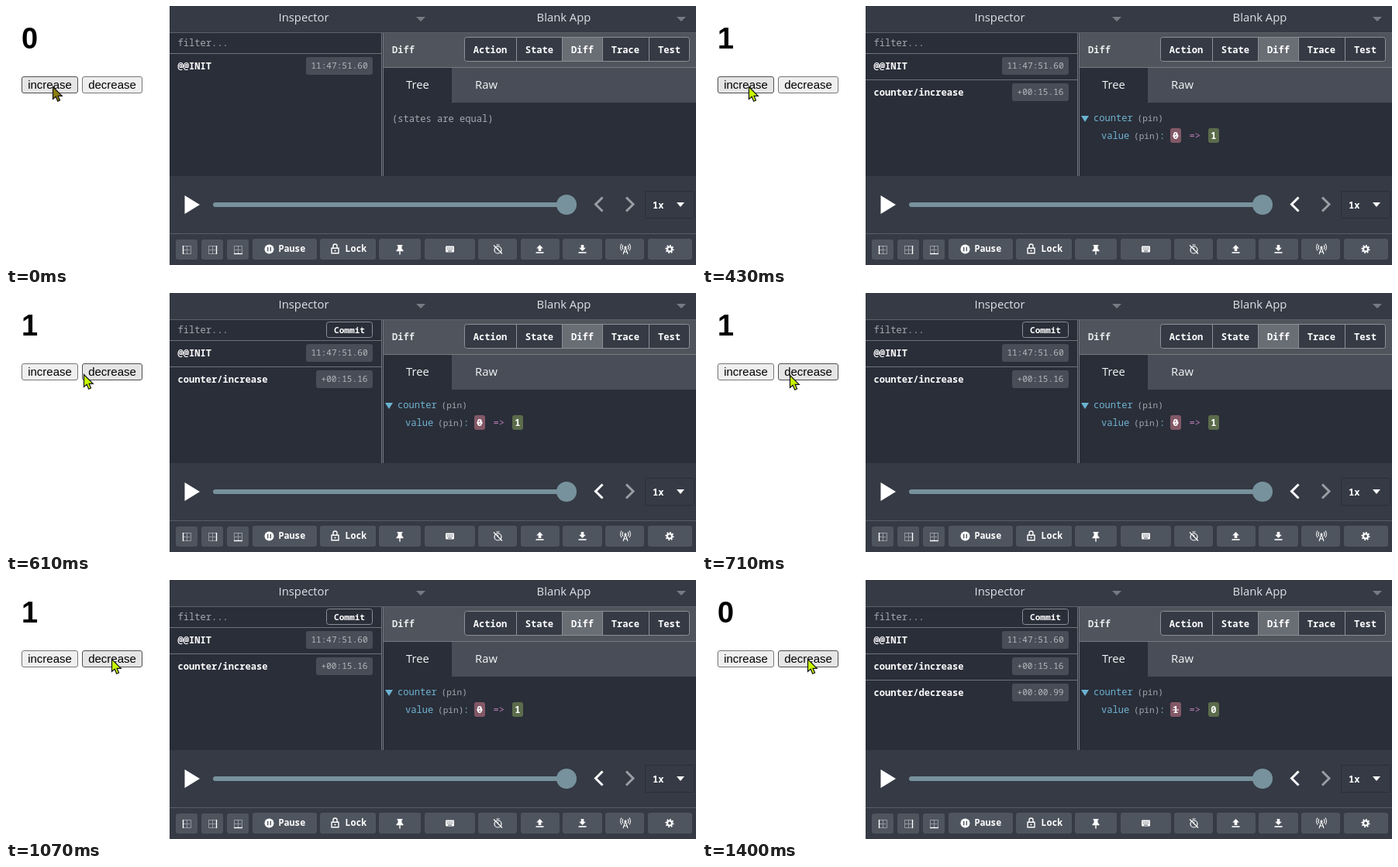
Write an HTML page that moves like this. It is 890x335 px and loops after 1630 ms.

```html
<!DOCTYPE html>
<html lang="en">
<head>
<meta charset="utf-8">
<title>Counter inspector</title>
<style>
  html, body { margin: 0; width: 100%; height: 100%; overflow: hidden; background: #fff; }
  svg { display: block; width: 890px; height: 335px; }
  text { white-space: pre; }
  .page { font: 15px "Liberation Sans", Arial, sans-serif; fill: #000; }
  .count { font: bold 38px "Liberation Sans", Arial, sans-serif; fill: #000; }
  .ui { font: 14.8px "Open Sans", "Noto Sans", sans-serif; fill: #f4f5f6; }
  .head { fill: #dfe2e6; }
  .mono { font: 12.1px "Noto Sans Mono", "DejaVu Sans Mono", monospace; fill: #a6a9ae; }
  .bold { font-weight: 700; fill: #fff; }
  .small { font-size: 11.1px; }
  .key { fill: #6fb3d2; }
  .arrow { fill: #b77bb2; }
  .line { stroke: #6e727a; fill: none; }
  .ico { stroke: #fff; fill: none; stroke-width: 1.4; }
  .solid { fill: #fff; }
</style>
</head>
<body>
<svg id="stage" viewBox="0 0 890 335" xmlns="http://www.w3.org/2000/svg"></svg>
<script>
const LOOP = 1630;
const BG = '#2a2e39', BAR = '#353a45', TAB = '#494d57', BTN = '#4f555f';

const rect = (x, y, w, h, fill, r = 0, extra = '') =>
  `<rect x="${x}" y="${y}" width="${w}" height="${h}" rx="${r}" fill="${fill}" ${extra}/>`;
const text = (x, y, s, cls, anchor = 'start', extra = '') =>
  `<text x="${x}" y="${y}" class="${cls}" text-anchor="${anchor}" ${extra}>${s}</text>`;
const path = (d, cls = 'ico', extra = '') => `<path d="${d}" class="${cls}" ${extra}/>`;
const line = (d, color = '#6e727a') => path(d, 'line', `style="stroke:${color}"`);
const caret = (x, y, w, h, fill) => `<path d="M${x} ${y}h${w}l${-w / 2} ${h}z" fill="${fill}"/>`;
const group = (id, s) => `<g id="${id}">${s}</g>`;

// --- left page ---
const pageButton = (id, x, w, label) =>
  rect(x + .5, 91.5, w - 1, 21, '#efefef', 2.5, `id="${id}" stroke="#767676"`) +
  text(x + w / 2, 107, label, 'page', 'middle');

const page = rect(0, 0, 211, 335, '#fff') + text(20, 55, '0', 'count', 'start', 'id="count"') +
  pageButton('inc', 20, 73, 'increase') + pageButton('dec', 98, 78, 'decrease');

// --- action list ---
const action = (i, name, time, x) => {
  const y = 34 * i;
  return text(221.5, 82 + y, name, 'mono bold') +
    rect(x, 66 + y, 473 - x, 23, TAB, 3) +
    text((x + 473) / 2, 81 + y, time, 'mono small', 'middle', 'style="fill:#b5b8bd"');
};
const rule = y => line(`M211 ${y}H484`);

const list = text(221.5, 52, 'filter...', 'mono') + rule(61.5) +
  group('commit', rect(413.5, 37.5, 59, 20, BG, 3, 'stroke="#8b8f96"') +
    text(443, 52, 'Commit', 'mono bold', 'middle', 'style="font-size:11.1px"')) +
  action(0, '@@INIT', '11:47:51.60', 387) +
  group('row1', rule(95.5) + action(1, 'counter/increase', '+00:15.16', 400)) +
  group('row2', rule(129.5) + action(2, 'counter/decrease', '+00:00.99', 400));

// --- detail pane ---
const modes = [['Action', 624.5], ['State', 688], ['Diff', 743.5], ['Trace', 799], ['Test', 855.5]];
const detail = rect(487, 35, 403, 44, '#50545c') + line('M487 79.5H890', '#767a80') +
  text(498, 61, 'Diff', 'mono bold', 'start', 'style="fill:#e8eaec"') +
  rect(591.5, 40.5, 290, 31, BAR, 3) + rect(718, 41, 52, 30, '#696d74') +
  rect(591.5, 40.5, 290, 31, 'none', 3, 'stroke="#8b8f96"') +
  line('M658.5 41V71M717.5 41V71M769.5 41V71M829.5 41V71', '#8b8f96') +
  modes.map(([s, x]) => text(x, 61, s, 'mono bold', 'middle')).join('') +
  rect(487, 80, 403, 45, TAB) + rect(487, 80, 88, 45, BG) +
  text(531, 107, 'Tree', 'ui', 'middle') + text(619.5, 107, 'Raw', 'ui', 'middle') +
  group('equal', text(498, 150, '(states are equal)', 'mono')) +
  group('diff', caret(489, 142, 10, 8, '#6bb3d0') +
    text(505, 149, 'counter', 'mono key') + text(561.5, 149, '(pin)', 'mono small') +
    text(515, 172, 'value', 'mono key') + text(557, 172, '(pin)', 'mono small') +
    text(590, 172, ':', 'mono key') +
    rect(604, 158, 14, 19, '#835866', 3) + text(611, 172, '0', 'mono bold', 'middle', 'id="old"') +
    line('M607 168H615', '#fff') + text(628.5, 172, '=&gt;', 'mono arrow') +
    rect(653, 158, 14, 19, '#5b6c4b', 3) + text(660, 172, '1', 'mono bold', 'middle', 'id="new"'));

// --- playback ---
const player = rect(211, 220, 679, 115, BAR) + path('M230.500 245L250 257L230.500 269Z', 'solid') +
  rect(267, 254, 456, 6, '#77929d', 3) + '<circle cx="723" cy="257" r="13" fill="#77929d"/>' +
  path('M769.5 247.500L760.500 256.500L769.500 265.500', 'ico', 'id="back" stroke-width="3" style="stroke-width:3"') +
  path('M800 247.500L809 256.500L800 265.500', 'ico', 'style="stroke:#9a9da3;stroke-width:3"') +
  rect(824.5, 239.5, 63, 35, BAR, 1, 'stroke="#2a2e39"') +
  text(834, 262, '1x', 'mono bold') + caret(865, 254, 10, 6, '#fff');

// --- toolbar ---
const slots = [[219, 28], [252, 28], [285, 28], [318, 83], [405, 72], [481, 54], [540, 65],
  [609, 50], [664, 50], [718, 51], [773, 50], [828, 57]];
const dockIcon = (x, side) =>
  path(`M${x - 5} 310.500h10v10h-10z`, 'ico', 'style="stroke-width:1;stroke-dasharray:1 1;stroke:#d5d8dc"') +
  path(`M${x} 311v9M${x - 4} 315.500h8`, 'ico', 'style="stroke-width:1;stroke-dasharray:1 1;stroke:#d5d8dc"') +
  path(side, 'ico');
const tray = (x, arrow) => path(arrow, 'solid') + path(`M${x - 5} 319h10`, 'ico', 'style="stroke-width:1.6"');
const wave = (r, s) => {
  const dx = r * .75 * s, dy = r * .66;
  return `M${799 + dx} ${312 - dy}A${r} ${r} 0 0 ${s > 0 ? 1 : 0} ${799 + dx} ${312 + dy}`;
};

const tools = line('M211 294.5H890', '#585d66') +
  slots.map(([x, w]) => rect(x, x < 318 ? 302 : 301, w, x < 318 ? 26 : 27, BTN, 3)).join('') +
  dockIcon(233.5, 'M228.500 310V321') + dockIcon(266.5, 'M271.500 310V321') + dockIcon(299.5, 'M294 320.500H305') +
  '<circle cx="339.500" cy="314.500" r="6" fill="#fff"/>' +
  path('M337.700 311.800v5.400M341.300 311.800v5.400', 'ico', `style="stroke:${BTN}"`) +
  text(351.5, 318, 'Pause', 'mono bold', 'start', 'style="font-size:11.6px"') +
  path('M420 313.300h9v6.500h-9zM422 313v-2.500a2.500 2.500 0 0 1 5 0v2.500', 'ico') +
  '<circle cx="424.500" cy="316.500" r="1.100" fill="#fff"/>' +
  text(437.5, 318, 'Lock', 'mono bold', 'start', 'style="font-size:11.6px"') +
  path('M504.500 309h7v1.300h-1v3.700l2 2v1.300h-3.800v4l-.7 .8l-.7-.8v-4h-3.800v-1.300l2-2v-3.700h-1z', 'solid') +
  rect(567, 310.5, 11, 8, '#fff', 1) +
  path('M568.500 312.800h8M568.500 314.800h8', 'ico', `style="stroke:${BTN};stroke-width:1;stroke-dasharray:1 .75"`) +
  path('M570 317h5', 'ico', `style="stroke:${BTN};stroke-width:1"`) +
  '<circle cx="634.500" cy="315.500" r="4.500" class="ico" style="stroke-width:1.200"/>' +
  path('M632.500 309h4M634.500 313v2.500M629 309.500l11 11', 'ico', 'style="stroke-width:1.2"') +
  tray(688.5, 'M688.500 309l4.300 4.500h-2.500v3.500h-3.600v-3.500h-2.500z') +
  tray(743.5, 'M743.500 317l4.300-4.300h-2.500v-3.700h-3.600v3.700h-2.500z') +
  path(wave(4, 1) + wave(4, -1) + wave(6.5, 1) + wave(6.5, -1), 'ico', 'style="stroke-width:1.1"') +
  path('M799 312l-3 9M799 312l3 9M797.300 318h3.400', 'ico', 'style="stroke-width:1.1"') +
  '<circle cx="799" cy="312" r="1.500" fill="#fff"/>' +
  '<circle cx="856" cy="314.500" r="3" class="ico" style="stroke-width:2.200"/>' +
  `<circle cx="856" cy="314.500" r="4.700" class="ico" pathLength="16" style="stroke-width:1.800;stroke-dasharray:1 1"/>`;

const panel = rect(211, 0, 679, 335, BG) + rect(211, 0, 679, 34, BAR) + line('M211 34.5H890', '#5b6068') +
  text(384, 20, 'Inspector', 'ui head', 'middle') + text(719.5, 20, 'Blank App', 'ui head', 'middle') +
  caret(529, 14, 12, 6, '#767b83') + caret(865, 14, 12, 6, '#767b83') +
  list + detail + line('M484.5 35V220M486.5 35V220', '#747880') + player + tools;

const pointer = '<circle id="halo" r="15" fill="#ffff1e" fill-opacity=".65"/>' +
  '<path id="cursor" d="M.5 .5V16.500L4.200 13.300L6.700 19.300L9.600 18L7.100 12.300H12.300Z" stroke="#111" stroke-width="1.200"/>';

document.getElementById('stage').innerHTML = page + panel + pointer;
const el = {};
document.querySelectorAll('[id]').forEach(n => el[n.id] = n);

// pointer stops: time, x, y
const stops = [[0, 60, 104], [510, 68, 104], [560, 84, 105], [610, 100, 105], [660, 107, 106],
  [700, 113, 106], [750, 118, 107], [790, 122, 107], [840, 124, 107], [940, 128, 105],
  [990, 132, 103], [1070, 136, 102]];
const looks = {
  idle: ['#efefef', '#767676'], hover: ['#e5e5e5', '#4f4f4f'], press: ['#f5f5f5', '#8d8d8d']
};

const show = (id, on) => el[id].setAttribute('visibility', on ? 'visible' : 'hidden');
const paint = (id, look) => {
  el[id].setAttribute('fill', looks[look][0]);
  el[id].setAttribute('stroke', looks[look][1]);
};
const between = (t, a, b) => t >= a && t < b;

function render(t) {
  const [, x, y] = stops.filter(s => s[0] <= t).pop();
  const added = t >= 430, removed = t >= 1400;
  const firstClick = between(t, 330, 430), lastClick = between(t, 1300, 1350);

  el.count.textContent = between(t, 430, 1350) ? '1' : '0';
  paint('inc', between(t, 390, 430) ? 'press' : x < 93 ? 'hover' : 'idle');
  paint('dec', lastClick ? 'press' : x >= 98 ? 'hover' : 'idle');

  show('equal', !added);
  show('diff', added);
  show('row1', added);
  show('row2', removed);
  show('commit', t >= 510);
  el.old.textContent = removed ? '1' : '0';
  el.new.textContent = removed ? '0' : '1';
  el.back.style.stroke = added ? '#fff' : '#9a9da3';

  show('halo', firstClick || lastClick);
  const move = `translate(${x} ${y})`;
  el.halo.setAttribute('transform', move);
  el.cursor.setAttribute('transform', move);
  el.cursor.setAttribute('fill', t < 330 ? '#8a7d10' : lastClick ? '#dcd808' : '#c8f800');
}

let start;
function tick(now) {
  start ??= now;
  render((now - start) % LOOP);
  requestAnimationFrame(tick);
}
render(0);
requestAnimationFrame(tick);
</script>
</body>
</html>
```
